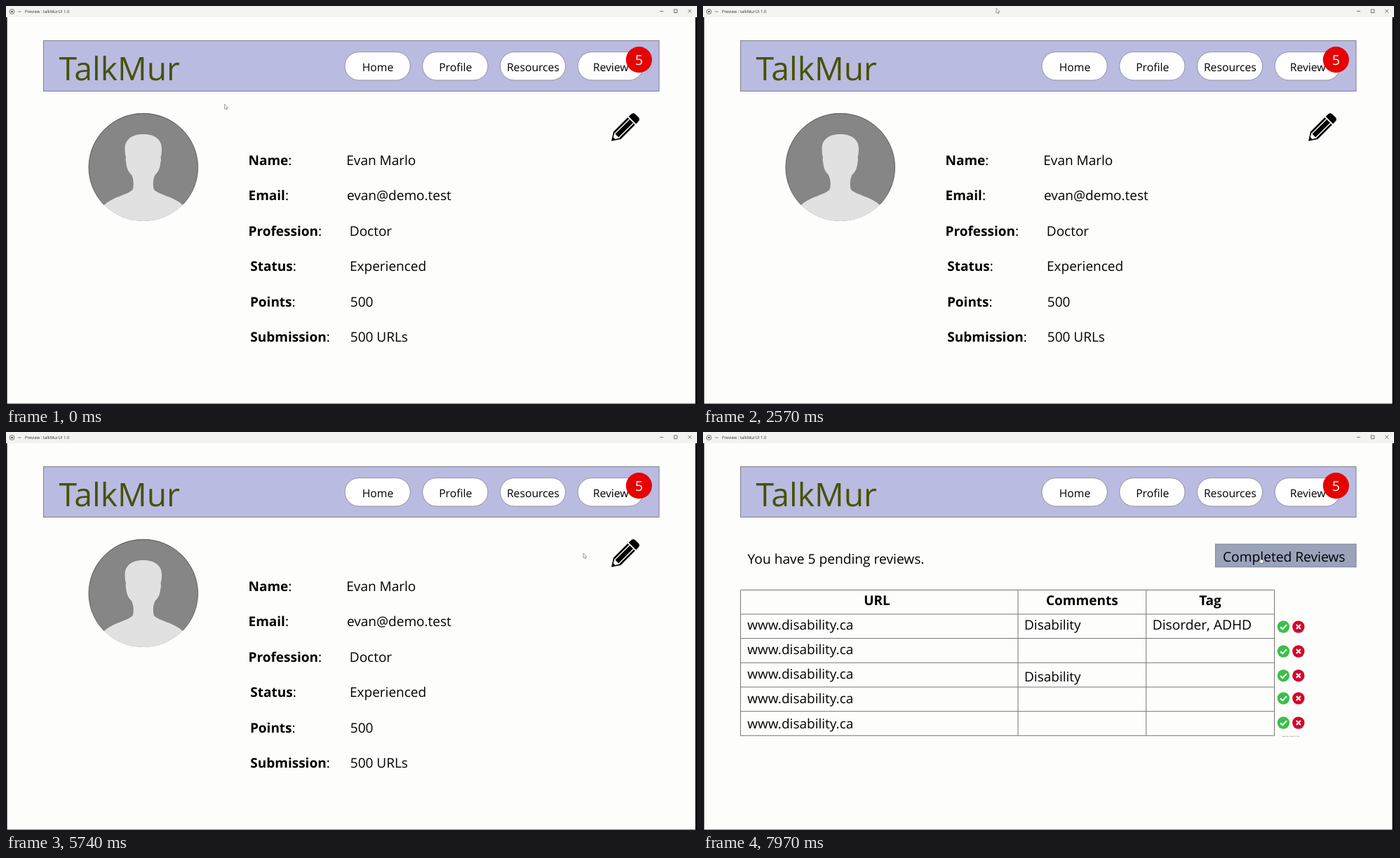
These frames come from a looping animation (985x568 px, 8 s). An HTML page:

```html
<!DOCTYPE html>
<html lang="en">
<head>
<meta charset="utf-8">
<title>Profile and reviews</title>
<style>
html, body { margin: 0; width: 100%; height: 100%; overflow: hidden; background: #fdfdfc; }
svg { display: block; width: 100vw; height: 100vh; }
text { font-family: "Open Sans", "Noto Sans", sans-serif; font-size: 19px; fill: #000; text-rendering: geometricPrecision; }
.b { font-weight: 700; }
.nav { font-size: 15.7px; text-anchor: middle; }
.mid { text-anchor: middle; }
.wide { font-size: 19.2px; }
.line { fill: none; stroke: #777; stroke-width: 1; }
</style>
</head>
<body>
<svg viewBox="0 0 985 568" preserveAspectRatio="none">
  <defs>
    <clipPath id="round"><ellipse cx="195.7" cy="230" rx="77.8" ry="77"/></clipPath>
  </defs>
  <rect width="985" height="568" fill="#fdfdfc"/>
  <rect width="985" height="16" fill="#f3f3f1"/>
  <path d="M0 16H1.6V567.4H982.6V16H985V568H0Z" fill="#080808"/>

  <g fill="none" stroke="#555" stroke-width=".8">
    <circle cx="8.5" cy="8" r="3.4"/>
    <circle cx="8.5" cy="8" r="1.3" fill="#444" stroke="none"/>
    <path d="M17.4 7l2 2 2-2M932 7.5h5M952.3 5h4.6v4.6h-4.6zM972.3 4.800l4.8 4.800M977.1 4.800l-4.8 4.800"/>
  </g>
  <text x="26.9" y="10.4" style="font-size:5.95px;fill:#333">Preview : talkMurUI 1.0</text>

  <rect x="53.5" y="49.5" width="877.5" height="72" fill="#babbe1" stroke="#80808c"/>
  <text x="75.5" y="106" style="font-size:46.2px;fill:#465203">TalkMur</text>
  <g id="nav"></g>
  <circle cx="902.3" cy="76.6" r="18.6" fill="#e70202"/>
  <text class="mid" x="902.3" y="84.300" style="font-size:19.5px;fill:#fff">5</text>

  <g id="profile">
    <ellipse cx="195.7" cy="230" rx="77.8" ry="77" fill="#868686"/>
    <g clip-path="url(#round)">
      <path fill="#e1e1e1" d="M195.7 183C180 183 169.500 190 169.500 204Q169.500 211 171 216Q170 219 171.300 224C172 232 174.500 237 179 241C182 247 182.500 256 180.500 262C173 270 152 272 139 285V310H253V285C240 272 218.500 270 211 262C209 256 209.500 247 212.500 241C217 237 219.500 232 220.200 224Q221.500 219 220.500 216Q222 211 222 204C222 190 211.500 183 195.700 183Z"/>
    </g>
    <path d="M139.500 283.500A77.800 77 0 1 1 252 283.500" fill="none" stroke="#4c4c4c" stroke-width=".8"/>
    <g transform="translate(863 192.800) rotate(-45) scale(.96)">
      <path d="M0 0L12-7.700H42V7.700H12Z"/>
      <path d="M44-7.700H48.500Q53.500-7.700 53.500-3V3Q53.500 7.700 48.500 7.700H44Z"/>
      <path d="M6-2L12.500-5.700V5.700L6 2Z" fill="#fdfdfc"/>
      <path d="M12-4.200H42M12 4.200H42" stroke="#fdfdfc" stroke-width="1.500"/>
      <path d="M11.500-3.400H14V3.400H11.500Z"/>
    </g>
    <g id="fields"></g>
  </g>

  <g id="reviews">
    <text class="wide" x="63.500" y="187.500">You have 5 pending reviews.</text>
    <rect x="730.500" y="160" width="200.500" height="32.700" fill="#9aa3ba" stroke="#77819a"/>
    <text class="wide" x="741" y="184.500">Completed Reviews</text>
    <path class="line" d="M53.500 225.500H814.500V433.300H53.500Z"/>
    <path class="line" stroke-width="1.300" d="M53.500 260H814.500M53.500 294.500H814.500M53.500 329.300H814.500M53.500 364H814.500M53.500 398.700H814.500M449 225.500V433.300M631.700 225.500V433.300"/>
    <g id="cells"></g>
    <text class="mid" x="838" y="435.300" style="font-size:2.200px;fill:#555">approve or reject it here</text>
  </g>

  <g id="cursor" stroke-linejoin="round">
    <path id="arrow" d="M0 0V7L1.600 5.600L2.700 8L3.900 7.400L2.800 5.200H5Z" fill="#fff" stroke="#777" stroke-width=".7"/>
    <path id="hand" d="M0 .5Q.9-.5 1.600 .5V3.500L4.800 4.300Q5.300 4.600 5.100 5.500L4.400 8.700H.7L-1.800 5.500Q-1.700 4.500-.7 4.900L0 5.500Z" fill="#fff" stroke="#555" stroke-width=".7"/>
  </g>
</svg>
<script>
const LOOP = 8000;
const PAGE_AT = 5900;
const $ = id => document.getElementById(id);
const text = (x, y, str, cls = "") => `<text class="${cls}" x="${x}" y="${y}">${str}</text>`;

$("nav").innerHTML = ["Home", "Profile", "Resources", "Review"].map((name, i) => {
  const x = 483 + i * 110.7;
  return `<rect x="${x}" y="65.6" width="93.2" height="40.3" rx="20" fill="#fefefe" stroke="#80808c" stroke-width=".8"/>` +
    text(x + 47, 92.8, name, "nav");
}).join("");

$("fields").innerHTML = [
  ["Name", "Evan Marlo", 345.5, 485.3],
  ["Email", "evan@demo.test", 345.5, 486],
  ["Profession", "Doctor", 345.5, 489.8],
  ["Status", "Experienced", 348.3, 490],
  ["Points", "500", 347.9, 490.8],
  ["Submission", "500 URLs", 348.3, 490.8]
].map(([label, value, lx, vx], i) => {
  const y = 226.5 + i * 50.5;
  return text(lx, y, `<tspan class="b">${label}</tspan>:`) + text(vx, y, value);
}).join("");

const mark = (x, y, color, d) =>
  `<g transform="translate(${x} ${y})"><circle r="8.7" fill="${color}"/>` +
  `<path d="${d}" fill="none" stroke="#fff" stroke-width="2.1"/></g>`;

$("cells").innerHTML =
  text(248, 247, "URL", "b mid") + text(540.3, 247, "Comments", "b mid") + text(723, 247, "Tag", "b mid") +
  text(458, 282, "Disability") + text(458, 356, "Disability") + text(640.7, 282, "Disorder, ADHD", "wide") +
  [278, 313, 347.7, 380, 415].map((y, i) =>
    text(63.3, 282 + i * 35.15, "www.disability.ca") +
    mark(827.4, y, "#3cbf4b", "M-4.300 .2L-1.300 3.200L4.500-2.800") +
    mark(848.8, y, "#d3082b", "M-3-3L3 3M3-3L-3 3")
  ).join("");

// Pointer stops: time, x, y
const stops = [
  [0, 311.5, 140], [300, 311.5, 140], [360, 312.5, 142.5], [1530, 312.5, 142.5],
  [2330, 416, 5], [2570, 418, 3], [3170, 450, 5], [4000, 815, 111], [4230, 825, 116],
  [4600, 845, 94], [5000, 845, 94], [5370, 823, 173], [5740, 823, 173],
  [5900, 823.5, 178.5], [6500, 823.5, 178.5], [7300, 794, 178.5], [LOOP, 794, 178.5]
];

function pointer(t) {
  const i = stops.findIndex(s => s[0] > t);
  const [t0, x0, y0] = stops[i - 1], [t1, x1, y1] = stops[i];
  const u = (t - t0) / (t1 - t0), k = u * u * (3 - 2 * u);
  return [x0 + (x1 - x0) * k, y0 + (y1 - y0) * k];
}

const show = (id, on) => $(id).setAttribute("display", on ? "inline" : "none");

function draw(t) {
  const [x, y] = pointer(t);
  const review = t >= PAGE_AT;
  const onPill = x > 815 && x < 908 && y > 66 && y < 106;
  const hand = review || onPill;
  show("profile", !review);
  show("reviews", review);
  show("hand", hand);
  show("arrow", !hand);
  $("cursor").setAttribute("transform", `translate(${x} ${y})`);
}

const start = performance.now();
function tick() {
  draw((performance.now() - start) % LOOP);
  requestAnimationFrame(tick);
}
tick();
</script>
</body>
</html>
```
